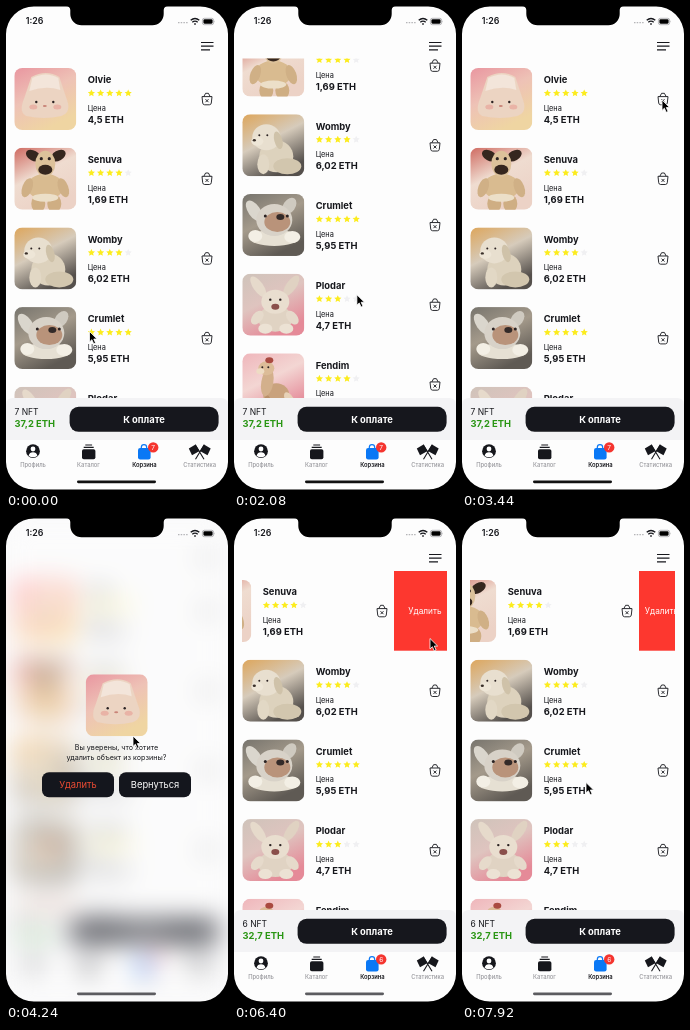
Animation of 222x484 px, one loop 8000 ms. Source, as an HTML page:

```html
<!DOCTYPE html>
<html lang="ru">
<head>
<meta charset="utf-8">
<title>Корзина</title>
<style>
html, body { margin: 0; width: 100%; height: 100%; overflow: hidden; background: #fff; }
svg { position: absolute; inset: 0; width: 100%; height: 100%; display: block; }
text { font-family: Inter, Roboto, sans-serif; fill: #16171c; }
.b { font-weight: 700; font-size: 9.4px; }
.mid { text-anchor: middle; }
.tab { font-size: 5.8px; font-weight: 500; fill: #98989d; text-anchor: middle; }
.ask { font-size: 7.2px; text-anchor: middle; }
.act { font-size: 9.4px; text-anchor: middle; }
</style>
</head>
<body>
<svg viewBox="0 0 222 484">
  <defs id="defs">
    <clipPath id="list"><rect x="8" y="52.5" width="205" height="350"/></clipPath>
    <clipPath id="round"><rect width="62" height="62" rx="8"/></clipPath>
  </defs>
  <g id="scene">
    <rect width="222" height="484" fill="#fdfdfd"/>
    <path d="M195 36.5h12.5M195 40.2h12.5M195 43.9h9" stroke="#16171c" stroke-width="1.2"/>
    <g clip-path="url(#list)">
      <g id="rows"></g>
      <g id="del">
        <rect id="red" y="53" width="62" height="79.7" fill="#fd372f"/>
        <text id="redText" class="mid" y="96" style="font-size:8.3px;fill:#fff">Удалить</text>
      </g>
    </g>
    <path d="M0 434V399q0-7 7-7H215q7 0 7 7v35z" fill="#f3f3f5"/>
    <text id="count" x="8.5" y="408.5" style="font-size:8.5px"></text>
    <text id="total" class="b" x="8.5" y="421.3" style="fill:#2a9614"></text>
    <rect x="63.6" y="400.8" width="149" height="25" rx="9" fill="#16171d"/>
    <text class="b mid" x="138" y="416.7" style="fill:#fff">К оплате</text>
    <rect y="434" width="222" height="50" fill="#fdfdfd"/>
    <g fill="#16171c">
      <circle cx="27" cy="445.2" r="6.9"/>
      <circle cx="27" cy="443" r="2.4" fill="#fff"/>
      <path d="M22.6 449.7q.8-3.4 4.4-3.4t4.4 3.4q-4.4 3.2-8.8 0z" fill="#fff"/>
      <path d="M79.3 438.4h6.8v1.2h-6.8zM77.7 440.7h10v1.3h-10z"/>
      <rect x="76" y="443.2" width="13.4" height="10" rx="1.8"/>
      <path d="M189.5 438.4L193.6 445 186 449.2 182.8 442.6zM198 438.4L193.9 445 201.500 449.2 204.700 442.6z"/>
      <path d="M189.300 438.700L198 453.300M198.200 438.700L189.500 453.300" stroke="#16171c" stroke-width="1.1"/>
    </g>
    <path d="M135.3 443v-1.5q0-2.8 2.7-2.8t2.7 2.8v1.5" fill="none" stroke="#0a78f5" stroke-width="1.2"/>
    <rect x="132" y="442" width="12.6" height="11.500" rx="2.200" fill="#0a78f5"/>
    <circle cx="147.2" cy="441.4" r="5.2" fill="#f5352f"/>
    <text id="badge" class="mid" x="147.2" y="443.8" style="font-size:6.6px;fill:#fff"></text>
    <text class="tab" x="27" y="460.7">Профиль</text>
    <text class="tab" x="82.5" y="460.7">Каталог</text>
    <text class="tab" x="138.4" y="460.7" style="fill:#16171c;font-weight:600">Корзина</text>
    <text class="tab" x="193.7" y="460.7">Статистика</text>
  </g>
</svg>

<svg id="pop" viewBox="0 0 222 484">
  <filter id="blur" x="-20%" y="-20%" width="140%" height="140%" color-interpolation-filters="sRGB">
    <feGaussianBlur stdDeviation="13"/>
    <feColorMatrix type="saturate" values="1.5"/>
  </filter>
  <rect width="222" height="484" fill="#f9f9fa"/>
  <use href="#scene" filter="url(#blur)" opacity=".68"/>
  <use id="pic" x="79.7" y="156.3"/>
  <text class="ask" x="110.5" y="232.2">Вы уверены, что хотите</text>
  <text class="ask" x="110.5" y="241.6">удалить объект из корзины?</text>
  <rect x="36" y="254.3" width="72" height="25" rx="7" fill="#14161d"/>
  <rect x="113" y="254.3" width="72" height="25" rx="7" fill="#14161d"/>
  <text class="act" x="72" y="270.2" style="fill:#ee4b33">Удалить</text>
  <text class="act" x="149" y="270.2" style="fill:#fff">Вернуться</text>
</svg>

<svg viewBox="0 0 222 484">
  <path fill-rule="evenodd" d="M0 0H222V484H0zM28 .4A28 28 0 0 0 0 28V456A28 28 0 0 0 28 483.6H194A28 28 0 0 0 222 456V28A28 28 0 0 0 194 .4z"/>
  <path d="M60 0H162Q158 .3 157.7 4V8A11.300 11.300 0 0 1 146.400 19.300H75.600A11.300 11.300 0 0 1 64.300 8V4Q64 .3 60 0z"/>
  <text x="19.8" y="18.4" style="font-size:8.8px;font-weight:600">1:26</text>
  <path d="M172 16.6h10" stroke="#b5b5b8" stroke-width="1.3" stroke-dasharray="1.5 1.2"/>
  <g fill="none" stroke="#16171c" stroke-width="1.4">
    <path d="M184.7 14.3q4.3-3.7 8.6 0M186.3 16.2q2.7-2.2 5.4 0"/>
    <path d="M188.2 18h1.6"/>
  </g>
  <rect x="196.4" y="12.3" width="11.2" height="6.4" rx="1.9" fill="none" stroke="#9a9a9e" stroke-width=".7"/>
  <rect x="197.4" y="13.3" width="9.2" height="4.4" rx="1.1"/>
  <path d="M208.5 14.4q1 1.1 0 2.2z" fill="#9a9a9e"/>
  <rect id="home" x="71" y="474.5" width="79" height="2.7" rx="1.35"/>
  <path id="cursor" d="M0 0V10.4L2.4 8.2 4.2 12.3 6.1 11.5 4.3 7.5H7.6z" stroke="#fff" stroke-width=".8"/>
</svg>

<script>
const $ = id => document.getElementById(id);
const LOOP = 8000, STEP = 80, TOP = 53, ROW = 79.7;

const items = [
  ['Olvie', 5, '4,5'], ['Senuva', 4, '1,69'], ['Womby', 4, '6,02'], ['Crumlet', 5, '5,95'],
  ['Plodar', 3, '4,7'], ['Fendim', 4, '9,02'], ['Tulvo', 4, '5,32']
];

// Shape helpers for the toy pictures
const el = (x, y, rx, ry, fill, turn = 0) =>
  `<ellipse rx="${rx}" ry="${ry}" fill="${fill}" transform="translate(${x} ${y}) rotate(${turn})"/>`;
const shape = (d, fill) => `<path d="${d}" fill="${fill}"/>`;
const eyes = (x, y, gap, r = 1.2) => el(x, y, r, r, '#2b2222') + el(x + gap, y, r, r, '#2b2222');

const art = [
  [['#e996a0', '#eec2b6', '#efd5a2'],
    shape('M17 9Q32 1 45 9L52 30Q58 44 47 48 30 52 12 48 4 44 10 30z', '#ecd4c2') +
    shape('M18 10Q32 3 44 10L46 22Q32 17 15 23z', '#f3e5da') +
    el(19, 39, 4, 2.5, '#e9b3a6') + el(43, 39, 4, 2.5, '#e9b3a6') + eyes(22, 34, 17) +
    el(30.5, 38, 2, 1, '#c98478')],
  [['#cf6a61', '#efdcd0', '#ecd2c6'],
    el(19, 8, 8, 5, '#35261e', 30) + el(44, 8, 8, 5, '#35261e', -30) +
    el(24, 56, 7, 9, '#cfae83') + el(40, 56, 7, 9, '#cfae83') +
    el(31, 39, 18, 13, '#d9bb90') + el(13, 40, 5, 10, '#d0b086', 20) + el(49, 40, 5, 10, '#d0b086', -20) +
    el(31, 16, 10, 13, '#dcc19a') + el(31, 22, 7, 5, '#35261e') + eyes(27, 11, 8, 1.6) +
    el(31, 50, 13, 4, '#ecdfc8')],
  [['#dda65c', '#d6cbbb', '#55504c'],
    el(34, 42, 17, 16, '#ddd2bd') + el(45, 52, 14, 8, '#d2c6ae') + el(21, 50, 6, 10, '#e2d8c5') +
    el(24, 23, 14, 13, '#e8dfcf') + el(36, 26, 4, 9, '#cfc2a9', -15) +
    el(15, 27, 6, 4.5, '#eee6d7') + eyes(17, 21, 8, 1) + el(12, 26, 1.6, 1.2, '#3a302a')],
  [['#77746d', '#a49a8b', '#5f5a54'],
    el(12, 17, 6, 12, '#dad6cd', -35) + el(47, 12, 6, 9, '#cfcac0', 35) +
    el(32, 44, 25, 8, '#e6e0d3') + el(13, 42, 7, 6, '#f3efe5') + el(50, 43, 8, 6, '#f3efe5') +
    el(32, 26, 18, 16, '#d8d2c8') + el(35, 28, 13, 10, '#b9937a') +
    el(38, 23, 4, 3, '#332a28') + eyes(23, 22, 22, 1.5)],
  [['#cfc3ba', '#dfc4bf', '#e58a98'],
    el(16, 13, 5, 12, '#e6dacb', -35) + el(49, 12, 5, 12, '#e0d2c2', 35) +
    el(33, 45, 17, 13, '#e0d3c3') + el(33, 28, 14, 12, '#e9decf') +
    el(15, 44, 5, 8, '#e6dacb', 40) + el(50, 44, 5, 8, '#e6dacb', -40) +
    el(23, 55, 7, 5, '#ece2d4') + el(44, 55, 7, 5, '#ece2d4') +
    eyes(28, 26, 10) + el(33, 33, 4, 3, '#8a4f4b')],
  [['#efb6bb', '#f3d6d3', '#e58c9a'],
    el(34, 42, 13, 12, '#c9a27d') + el(25, 52, 4, 10, '#b98f69') + el(41, 54, 4, 9, '#b98f69') +
    el(25, 29, 6, 14, '#d3b08c', 10) + el(24, 15, 8, 7, '#dcbc98') +
    el(18, 18, 4, 3, '#eedcc4') + el(27, 7, 4, 3, '#a94a40') + eyes(20, 14, 6, 1) +
    el(47, 46, 4, 8, '#e7d2b8', -30)],
  [['#d9c7d8', '#efe4ea', '#c9a6b4'],
    el(31, 46, 15, 13, '#e7dccf') + el(31, 25, 14, 13, '#f0e8dd') + eyes(26, 24, 10)]
];

art.forEach(([cols, body], i) => {
  const stops = cols.map((c, k) => `<stop offset="${k / 2}" stop-color="${c}"/>`).join('');
  $('defs').innerHTML +=
    `<linearGradient id="bg${i}" x2=".5" y2="1">${stops}</linearGradient>` +
    `<g id="art${i}" clip-path="url(#round)"><rect width="62" height="62" fill="url(#bg${i})"/>${body}</g>`;
});

const starPath = (cx, cy, r) => 'M' + Array.from({ length: 10 }, (_, k) => {
  const a = k * Math.PI / 5, q = k % 2 ? r * .48 : r;
  return `${(cx + q * Math.sin(a)).toFixed(2)} ${(cy - q * Math.cos(a)).toFixed(2)}`;
}).join('L') + 'z';

const stars = n => [0, 1, 2, 3, 4].map(k =>
  shape(starPath(85.4 + k * 9.2, 34.3, 3.8), k < n ? '#fcec1e' : '#f0f0f2')).join('');

const bag = `<g transform="translate(201 39.8)" fill="none" stroke="#16171c" stroke-width=".9" stroke-linejoin="round">
  <path d="M-5-2.2H5L4.3 4.2Q4 6 2.4 6H-2.4Q-4 6-4.3 4.2zM-3.2-2.2L-1.4-5.5H1.4L3.2-2.2M-1.5.4l3 3m0-3l-3 3"/></g>`;

$('rows').innerHTML = items.map(([name, n, price], i) => `<g>
  <use href="#art${i}" x="8.3" y="9"/>
  <text class="b" x="81.7" y="24.3">${name}</text>${stars(n)}
  <text x="81.7" y="52" style="font-size:7.4px">Цена</text>
  <text class="b" x="81.7" y="64">${price} ETH</text>${bag}</g>`).join('');
const rows = [...$('rows').children];

const ease = {
  lin: p => p,
  out: p => 1 - (1 - p) ** 2,
  io: p => p * p * (3 - 2 * p)
};

// Each step: time, value, easing used to arrive there
const track = {
  x: [[0, 83.5], [900, 83.5], [1440, 104, 'lin'], [1700, 106, 'out'], [1840, 106], [2160, 126],
    [2640, 188], [2720, 194, 'lin'], [3360, 200, 'out'], [3680, 200], [4240, 127, 'lin'], [4480, 76, 'out'],
    [4960, 80], [5280, 80], [5680, 178], [5760, 177], [6080, 114], [6400, 196], [6640, 196],
    [7200, 148], [7600, 148], [7920, 124], [8000, 122]],
  y: [[0, 325.5], [900, 325.5], [1440, 178.5, 'lin'], [1700, 172, 'out'], [1840, 174], [2160, 310],
    [2640, 141], [2720, 128, 'lin'], [3360, 94, 'out'], [3680, 94], [4240, 218, 'lin'], [4480, 266, 'out'],
    [4960, 267], [5280, 267], [5680, 112], [5760, 112], [6080, 114], [6400, 120.5], [6640, 120.5],
    [7200, 268], [7600, 268], [7920, 264.5], [8000, 264]],
  scroll: [[0, 0], [920, 0], [1440, 139, 'lin'], [1760, 196, 'out'], [1880, 196], [2160, 80, 'lin'],
    [2400, -20, 'lin'], [2520, -38, 'out'], [2720, -19.5], [3000, 0, 'out']],
  gone: [[0, 0], [4640, 0], [5040, 1, 'out']],
  swipe: [[0, 0], [5760, 0], [6080, 53], [7840, 53], [7920, 36, 'lin'], [8000, 19, 'lin']],
  pop: [[0, 0], [3600, 0], [3840, 1], [4560, 1], [4800, 0], [6560, 0], [6800, 1], [7440, 1], [7680, 0]]
};

function at(steps, t) {
  const i = steps.findIndex(s => s[0] > t);
  if (i < 0) return steps[steps.length - 1][1];
  const [t0, v0] = steps[i - 1], [t1, v1, kind = 'io'] = steps[i];
  return v0 + (v1 - v0) * ease[kind]((t - t0) / (t1 - t0));
}

const move = (node, x, y) => node.setAttribute('transform', `translate(${x.toFixed(2)} ${y.toFixed(2)})`);

function draw(t) {
  const v = {};
  for (const k in track) v[k] = at(track[k], t);
  rows.forEach((row, i) => {
    const shift = i ? v.gone * ROW : 0;
    move(row, i === 1 ? -v.swipe : 0, TOP + i * ROW - v.scroll - shift);
  });
  rows[0].setAttribute('opacity', 1 - v.gone);

  const left = 213 - v.swipe;
  $('del').style.display = v.swipe > 0 ? '' : 'none';
  $('red').setAttribute('x', left);
  $('redText').setAttribute('x', (left + 222) / 2);

  const less = t >= 4640;
  $('count').textContent = less ? '6 NFT' : '7 NFT';
  $('total').textContent = less ? '32,7 ETH' : '37,2 ETH';
  $('badge').textContent = less ? '6' : '7';

  $('pop').style.opacity = v.pop;
  $('pop').style.display = v.pop > 0 ? '' : 'none';
  $('pic').setAttribute('href', less ? '#art1' : '#art0');
  $('home').setAttribute('fill', t < 3680 ? '#111' : '#5c5c60');
  move($('cursor'), v.x, v.y);
}

const start = performance.now();
function tick() {
  const t = (performance.now() - start) % LOOP;
  draw(Math.floor(t / STEP) * STEP);
  requestAnimationFrame(tick);
}
tick();
</script>
</body>
</html>
```
